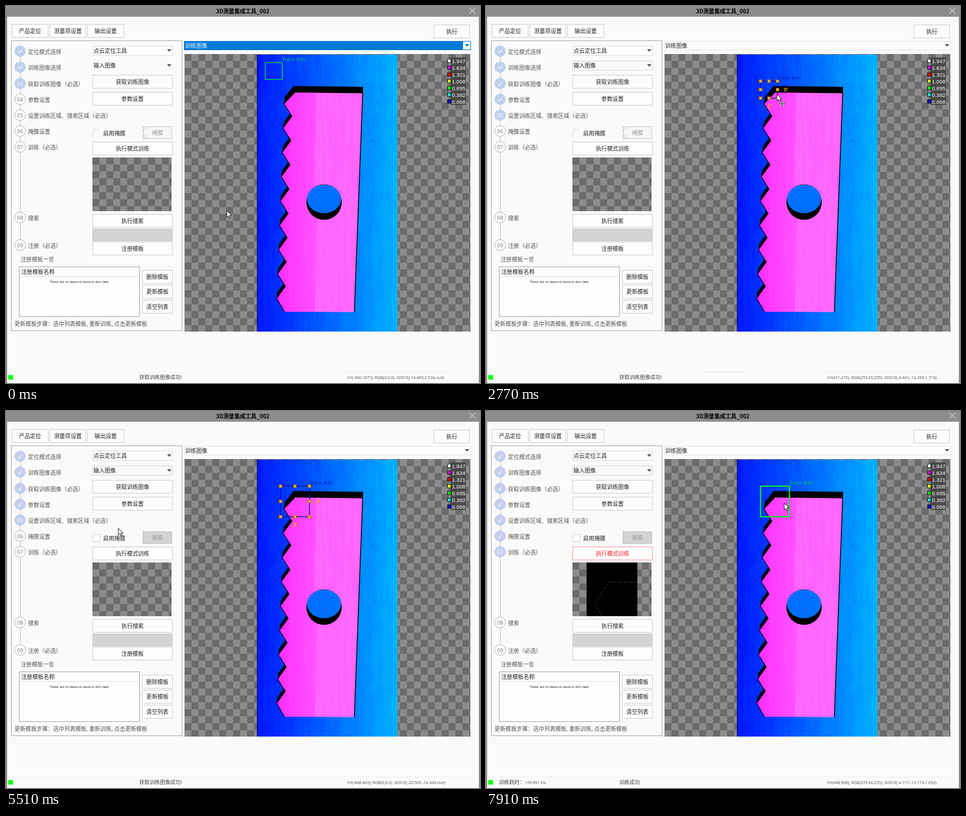
An HTML page with a canvas that plays this animation: 839 by 667 pixels, repeating every 8000 ms.

```html
<!DOCTYPE html>
<html lang="zh">
<head>
<meta charset="utf-8">
<title>3D测量集成工具</title>
<style>
html, body { margin: 0; width: 100%; height: 100%; overflow: hidden; background: #fafafa; }
canvas, svg { position: absolute; left: 0; top: 0; width: 839px; height: 667px; }
text { font-family: "Noto Sans CJK SC", "Noto Sans CJK", sans-serif; white-space: pre; }
.lat { font-family: "Open Sans", "Noto Sans", sans-serif; }
.ari { font-family: "Liberation Sans", sans-serif; }
.roi { font-family: "DejaVu Sans", sans-serif; letter-spacing: .9px; }
</style>
</head>
<body>
<canvas id="view" width="839" height="667"></canvas>
<svg viewBox="0 0 839 667"><g id="base"></g><g id="live"></g></svg>
<script>
const LOOP = 8000;
const $ = id => document.getElementById(id);

// ---------- height map ----------
const ctx = $('view').getContext('2d');
const hash = (x, y) => { const s = Math.sin(x * 127.1 + y * 311.7) * 43758.5453; return s - Math.floor(s); };
const mix = (a, b, p) => a + (b - a) * p;
function noise(x, y) {
  const i = Math.floor(x), j = Math.floor(y), u = x - i, v = y - j;
  return mix(mix(hash(i, j), hash(i + 1, j), u), mix(hash(i, j + 1), hash(i + 1, j + 1), u), v) - .5;
}
function field(w, h, color) {
  const c = document.createElement('canvas');
  c.width = w; c.height = h;
  const g = c.getContext('2d'), img = g.createImageData(w, h);
  for (let y = 0; y < h; y++) for (let x = 0; x < w; x++) {
    const [r, gr, b] = color(x, y), k = (y * w + x) * 4;
    img.data[k] = r; img.data[k + 1] = gr; img.data[k + 2] = b; img.data[k + 3] = 255;
  }
  g.putImageData(img, 0, 0);
  return c;
}
const level = (v, q) => Math.max(0, Math.round(v / q) * q);
const blue = (x, y) => [0, level(22 + .63 * x + noise(x / 3, y / 60) * 12 + noise(x / 9, y / 14) * 10 + noise(x / 2, y / 5) * 5, 9), 255];
function pink(x, y) {
  const e = x + noise(x / 2, y / 20) * 6;
  const g = e < 104 ? 65 + (x - 71) * .5 : 102;
  return [255, level(g + noise(x / 2, y / 70) * 10 + noise(x / 5, y / 25) * 5, 7), 255];
}
function path(pts, fill) {
  ctx.beginPath();
  pts.forEach(p => ctx.lineTo(p[0], p[1]));
  if (fill) { ctx.fillStyle = fill; ctx.fill(); }
}
function checker(x, y, w, h) {
  const s = 12.3;
  ctx.save();
  ctx.beginPath(); ctx.rect(x, y, w, h); ctx.clip();
  ctx.fillStyle = '#8c8c8c'; ctx.fillRect(x, y, w, h);
  ctx.fillStyle = '#6b6b6b';
  for (let j = 0; j * s < h; j++) for (let i = j % 2; i * s < w; i += 2)
    ctx.fillRect(x + i * s, y + j * s, s, s);
  ctx.restore();
}
function disc(x, y, rx, ry, fill) {
  ctx.beginPath(); ctx.ellipse(x, y, rx, ry, 0, 0, 7); ctx.fillStyle = fill; ctx.fill();
}
function drawView() {
  checker(316, 85, 506, 491);
  checker(153, 268, 140, 95);
  ctx.drawImage(field(249, 490, blue), 444, 86);
  ctx.fillStyle = '#10204a'; ctx.fillRect(444, 86, 1, 490);
  const tip = k => [492 - 1.6 * k, 173 + 43 * k], notch = k => [506 - 1.65 * k, 195 + 43 * k];
  const teeth = [[511, 153]];
  for (let k = 0; k < 9; k++) teeth.push(tip(k), k < 8 ? notch(k) : [493, 541]);
  path([[509, 141.5], [632, 143], [632, 155], [511, 154], [492, 174], [493, 162]], '#000');
  for (let k = 0; k < 8; k++) {
    const [nx, ny] = notch(k), [tx, ty] = tip(k + 1);
    path([[nx, ny], [tx, ty], [tx + 1, ty - 10], [nx - 3, ny - 5]], '#000');
  }
  ctx.save();
  path([...teeth, [616.5, 541.5], [631.5, 154.5]]);
  ctx.clip();
  ctx.drawImage(field(249, 490, pink), 444, 86);
  ctx.restore();
  ctx.strokeStyle = '#000'; ctx.lineWidth = 1.2;
  path(teeth); ctx.stroke();
  ctx.lineWidth = 1.5;
  path([[631.4, 154], [616.6, 541]]); ctx.stroke();
  disc(563, 347, 31.3, 31.3, '#000');
  disc(563, 341.4, 30.3, 25.2, '#006eff');
  disc(647, 238, 1, 1, '#013');
  disc(466, 515, 1.2, .8, '#013');
}

// ---------- markup helpers ----------
const text = (x, y, s, o = {}) => {
  const z = o.size || 9.85;
  return `<text x="${x}" y="${y + z * .37}" font-size="${z}" fill="${o.fill || '#222'}" class="${o.cls || ''}"` +
    ` text-anchor="${o.mid ? 'middle' : 'start'}" font-weight="${o.bold ? 700 : 400}">${s}</text>`;
};
const rect = (x, y, w, h, fill, stroke = 'none', sw = 1, extra = '') =>
  `<rect x="${x}" y="${y}" width="${w}" height="${h}" fill="${fill}" stroke="${stroke}" stroke-width="${sw}" ${extra}/>`;
const line = (d, stroke, w = 1, extra = '') => `<path d="${d}" fill="none" stroke="${stroke}" stroke-width="${w}" ${extra}/>`;
const tri = (x, y, fill) => `<path d="M${x - 4} ${y - 2}h8l-4 4.4z" fill="${fill}"/>`;
const button = (x, y, w, h, s, hot) =>
  rect(x + .5, y + .5, w - 1, h - 1, '#fdfdfd', hot ? '#f29a9a' : '#cbcbcb') +
  text(x + w / 2, y + h / 2, s, { mid: 1, fill: hot ? '#fb1e2b' : '#222' });

const STEPS = [[80, '定位模式选择'], [108, '训练图像选择'], [137, '获取训练图像（必选）'], [165, '参数设置'],
  [193, '设置训练区域、搜索区域（必选）'], [221, '掩膜设置'], [249, '训练（必选）'], [374, '搜索'], [423, '注册（必选）']];
const LEGEND = [['1.947', '#fff'], ['1.634', '#f0f'], ['1.321', '#f00'], ['1.008', '#ff0'],
  ['0.695', '#0f0'], ['0.382', '#0ff'], ['0.068', '#00f']];

function drawBase() {
  let s = rect(0, 0, 839, 19, '#8d8d8d') + rect(0, 19, 2, 648, '#8d8d8d') + rect(837, 19, 2, 648, '#8d8d8d');
  s += text(419, 9, '3D测量集成工具_002', { mid: 1, bold: 1, size: 9.8, fill: '#000' });
  s += line('M820.5 3.5l10 9.5M830.5 3.5l-10 9.5', '#fff', 1);
  ['产品定位', '测量项设置', '输出设置'].forEach((n, i) => s += button(10 + 67 * i, 32, 65, 24, n));
  s += button(757, 33, 64, 24, '执行');
  s += rect(9.5, 61.5, 302, 513, 'none', '#a2a6ab');
  s += line('M25.5 80V423', '#b9c0ca');
  STEPS.forEach(([y, n]) => s += text(39, y + 1.7, n, { fill: '#555' }));
  s += rect(153.5, 70.5, 141, 17, '#fdfdfd', '#dcdcdc') + text(155, 79, '点云定位工具') + tri(289, 78.5, '#555');
  s += text(155, 105.5, '输入图像') + tri(289, 105, '#555');
  s += button(153, 122, 142, 24, '获取训练图像');
  s += text(172, 225, '启用掩膜');
  s += button(153, 368, 142, 24, '执行搜索') + rect(153.5, 394.5, 141, 21, '#d4d4d4', '#c6c6c6');
  s += button(153, 417, 142, 24, '注册模板');
  s += text(26, 448, '注册模板一览', { fill: '#555' });
  s += rect(23.5, 461.5, 213, 88, '#fdfdfd', '#9aa4ae') + text(27, 470.5, '注册模板名称');
  s += line('M24 478.5H236', '#dedede');
  s += text(130, 487.3, 'There are no items to show in this view.', { size: 6.04, cls: 'ari', mid: 1 });
  ['删除模板', '更新模板', '清空列表'].forEach((n, i) => s += button(241, 467 + 26.5 * i, 54, 24, n));
  s += text(15, 562, '更新模板步骤：选中列表模板, 重新训练, 点击更新模板', { size: 9.8, fill: '#555' });
  s += line('M2 647.5H837', '#f0f0f0') + rect(4, 653, 8.5, 8, '#0f0');
  s += rect(787, 91, 27, 84, '#404040', 'none', 1, 'fill-opacity=".85"');
  LEGEND.forEach(([n, c], i) => {
    const y = 97 + 12 * i;
    s += rect(781.5, y - 3, 6, 6, c, '#111') + text(789.3, y, n, { size: 9.6, cls: 'ari', fill: '#fff' });
  });
  $('base').innerHTML = s;
}

// ---------- motion ----------
// each row: start, end, number of steps, values reached
function track(start, rows) {
  return t => {
    let v = start;
    for (const [a, b, n, ...to] of rows) {
      if (t < a) break;
      const p = t >= b ? 1 : Math.floor(n * (t - a) / (b - a) + .01) / n;
      v = v.map((q, i) => mix(q, to[i], p));
      if (p < 1) break;
    }
    return v;
  };
}
const pointer = track([391, 362], [[20, 800, 6, 489, 123], [1080, 2050, 7, 515, 156], [3870, 4550, 5, 289, 158],
  [4550, 4830, 2, 240, 172], [4835, 5920, 8, 158, 243], [5920, 6080, 1, 163, 248], [6907, 7910, 7, 528, 163]]);
const drag = track([0, 0], [[1080, 2050, 7, 27, 33]]);
const corner = track([516, 163], [[2910, 3750, 6, 537.5, 187]]);
// image x, image y, green value
const probe = track([-366, 1877, 57], [[20, 800, 6, 288, 249, 57], [1080, 2050, 7, 471, 475, 65],
  [2770, 3750, 7, 627, 689, 77], [3870, 4550, 5, -868, 463, 77], [6907, 7910, 7, 448, 568, 46]]);

function readout(t) {
  const [fx, fy, fg] = probe(t), x = Math.round(fx), y = Math.round(fy), g = Math.round(fg);
  const plate = y > 455 && x > 330, shade = !plate && y > 375 && x > 330, none = x < 0 || shade;
  const rgb = none ? '0,0,0' : plate ? `255,${g},255` : `0,${g},255`;
  const z = none ? 'null' : (plate ? 1.716 + (g - 65) * .00126 : .137 + (g - 57) * .0013).toFixed(3);
  const px = (-2.569 + (x - 627) * .012).toFixed(3), py = (-11.722 + (y - 689) * .012).toFixed(3);
  return `XY(${x},${y}), RGB(${rgb}), 3DXYZ(${px},${py},${z})`;
}

function steps(active) {
  return STEPS.map(([y], i) => {
    const on = i <= active, num = '0' + (i + 1);
    const c = `<circle cx="25" cy="${y}" r="9.6" fill="${on ? '#c0d0ec' : '#fdfdfd'}" stroke="${on ? '#c0d0ec' : '#a9a9a9'}" stroke-width=".9"/>`;
    return c + (i < active ? line(`M21.5 ${y + .5}l2.6 2.8l4.4 -6.6`, '#fff', 1.1)
      : text(25, y, num, { mid: 1, size: 9.5, cls: 'lat', fill: on ? '#fff' : '#777' }));
  }).join('');
}

function roi(x, y, x2, y2, edit, thick) {
  const w = x2 - x, h = y2 - y, c = edit ? '#0a0a96' : '#00e828', mx = x + w / 2, my = y + h / 2;
  let s = rect(x, y, w, h, 'none', c, thick ? 2.2 : 1.3);
  s += text(x2, y - 6, 'Train ROI', { size: 7.5, cls: 'roi', fill: c });
  if (!edit) return s;
  for (const hx of [x, mx, x2]) for (const hy of [y, my, y2])
    if (hx !== mx || hy !== my) s += rect(hx - 2.4, hy - 2.4, 4.8, 4.8, '#ffb428', '#a86c10', 1);
  s += line(`M${x2 + 17} ${my - 1}a2.6 2.6 0 1 0 -.5 2.6m-1.3 -2h3`, '#f0a010', 1.4);
  return s + line(`M${mx - 2} ${y2 + 11.5}h4.4l-4.4 5.4h4.6`, '#f0a010', 1.5);
}

const ARROW = 'l0 12l2.8 -2.6l2 4.4l1.9 -.9l-2 -4.2l3.7 -.2z';
const arrow = (x, y) => `<path d="M${x} ${y}${ARROW}" fill="#fff" stroke="#000" stroke-width=".9"/>`;
function cross(x, y) {
  const d = `M${x - 4} ${y}h8M${x} ${y - 4}v8`;
  const heads = [0, 90, 180, 270].map(a =>
    `<path d="M${x - 2.2} ${y - 3}h4.4l-2.2 -2.6z" transform="rotate(${a} ${x} ${y})" stroke="#fff" stroke-width=".5"/>`).join('');
  return line(d, '#fff', 2.6) + line(d, '#000', 1.1) + heads;
}
const ghost = (x, y, x2, y2) => rect(x, y, x2 - x, y2 - y, 'none', '#e8a030', 1, 'stroke-dasharray="5 2.5"');

function live(t) {
  const [cx, cy] = pointer(t), [dx, dy] = drag(t), [kx, ky] = corner(t);
  const moved = t >= 2770, sized = t >= 4005, trained = t >= 6650, fresh = t >= 5300;
  let s = steps(trained ? 6 : moved ? 4 : 2);

  s += t < 1080
    ? rect(315.5, 62.5, 507, 15, '#fdfdfd', '#0078d7') + rect(315, 62, 494, 16, '#0078d7') + text(317, 70, '训练图像', { fill: '#fff' }) + tri(816, 69.5, '#0078d7')
    : rect(315.5, 62.5, 507, 15, '#fdfdfd', '#e2e2e2') + text(317, 70, '训练图像') + tri(816, 69.5, '#555');
  if (moved) s += rect(153.5, 97.5, 141, 16, 'none', '#d4d4d4');

  s += button(153, 152, 142, 24, '参数设置', t >= 4540 && cy < 176 && t < 5920);
  s += button(153, 240, 142, 24, '执行模式训练', t >= 5770);
  s += fresh ? rect(153.5, 218.5, 13, 13, '#fff', '#cfcfcf') + rect(242.5, 213.5, 51, 21, '#d4d4d4', '#bebebe')
    : line('M153.5 231V218.5H165', '#d6d6d6') + rect(242.5, 213.5, 51, 21, '#f6f6f6', '#c4c4c4')
      + line('M244 222v-6h8M244 227v6h8', '#bbb', 1, 'stroke-dasharray="3 3"');
  s += text(268, 224, '掩膜', { mid: 1, fill: '#9a9a9a' });

  if (trained) s += rect(178, 268, 90, 95, '#000')
    + line('M267 303H218L192 340L205 362', '#999', .9, 'stroke-dasharray="1.5 5 1 3"');

  if (!moved) s += roi(459, 100, 489, 130, t >= 1080, t >= 670);
  else if (!sized) s += roi(486, 133, 516, 163, true);
  else s += roi(486, 133, 537, 187, !trained, t >= 7900);
  if (dx && !moved) s += ghost(459 + dx, 100 + dy, 489 + dx, 130 + dy);
  if (kx > 516 && !sized) s += ghost(486, 133, kx, ky);

  if (t >= 670 && t < 4400) s += line('M390 647.5H457', '#d9d9d9');
  if (t >= 6510) {
    s += text(23, 657, '训练耗时：', { size: 9.1, fill: '#444' });
    s += text(69, 657, '159.991 ms', { size: 6.95, cls: 'lat', fill: '#444' });
  }
  s += text(236, 657, t >= 6510 ? '训练成功' : '获取训练图像成功!', { size: 9.1, fill: '#444' });
  s += text(604, 657, readout(t), { size: 7.18, cls: 'lat', fill: '#555' });

  if (t >= 2910 && !sized) return s + cross(kx, ky);
  s += arrow(cx, cy);
  if (t >= 1080 && !sized) s += cross(497 + dx, 140 + dy);
  return s;
}

let last = '';
function tick() {
  const s = live(performance.now() % LOOP);
  if (s !== last) $('live').innerHTML = last = s;
  requestAnimationFrame(tick);
}
drawView();
drawBase();
tick();
</script>
</body>
</html>
```
